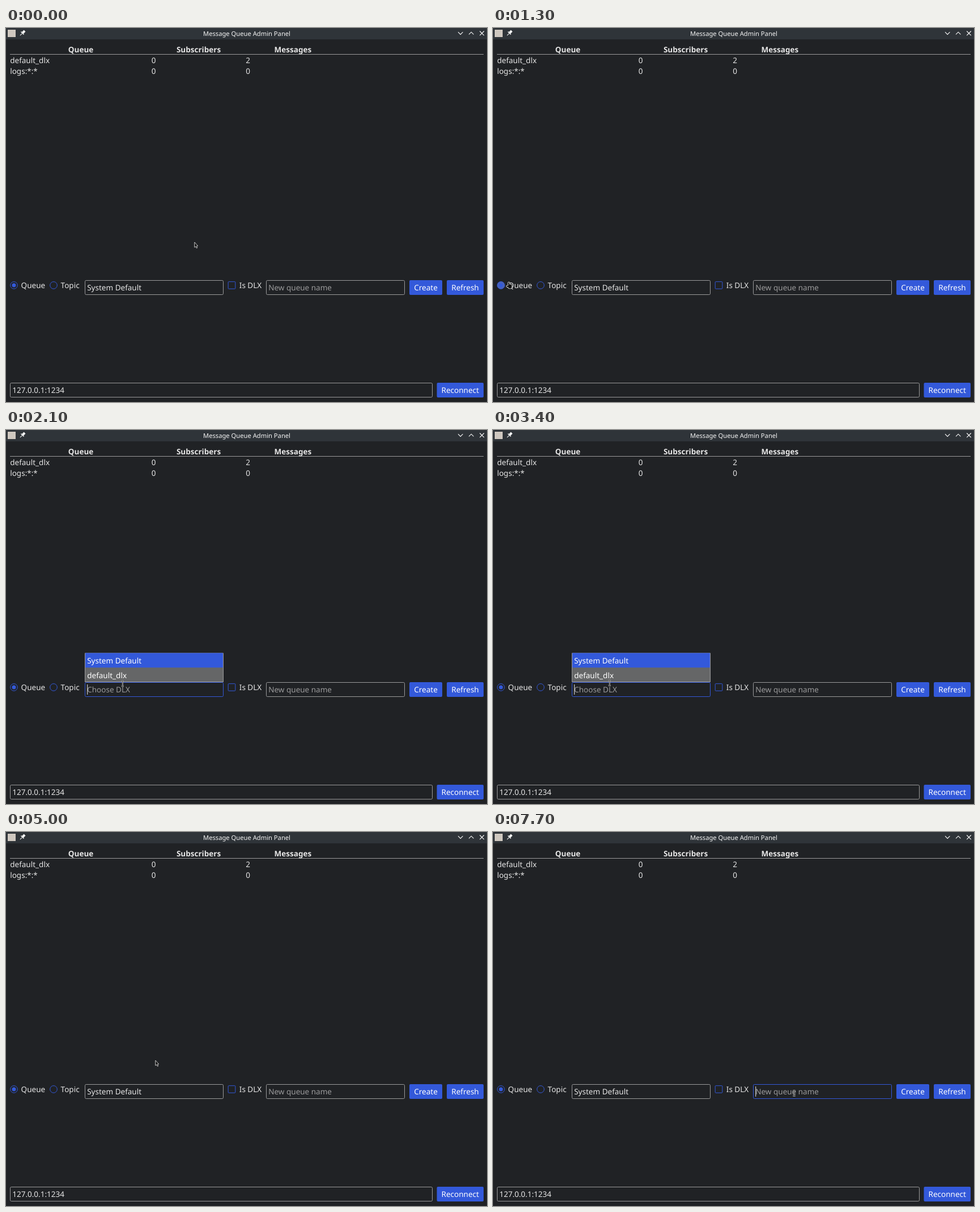
Animation, 849 px wide and 660 px high, one loop 8 s. Source, as an HTML page with a canvas:

```html
<!DOCTYPE html>
<html lang="en">
<head>
<meta charset="utf-8">
<title>Message Queue Admin Panel</title>
<style>
  html, body { margin: 0; width: 100%; height: 100%; overflow: hidden; background: #202225; }
  canvas { display: block; }
</style>
</head>
<body>
<canvas id="stage" width="849" height="660"></canvas>
<script>
const ctx = document.getElementById('stage').getContext('2d');
const LOOP = 8000, STEP = 100, SIZE = 13.52;
const BG = '#202225', TEXT = '#e6e6e6', BLUE = '#3359da', BLUE_WEAK = '#4c64b5',
      GRAY = '#9a9a9b', MENU = '#656667', WHITE = '#fff', ICON = '#fcfcfc', DARK = '#111';

// Pointer moves: start, end, target x and y
const START = [332.5, 377.5];
const MOVES = [
  [0, 900, 89, 443], [900, 1300, 28, 448], [1400, 1900, 205.8, 447.5], [3300, 3400, 205.8, 446.5],
  [3700, 4000, 204, 462], [4300, 4800, 263.5, 402.5], [5200, 5800, 531.5, 461]
];

// Boxes: x, y, width, height
const DLX = [139, 445, 245, 26], NAME = [459, 445, 245, 26], ADDRESS = [7, 626, 746, 26];
const MENU_BOX = [139, 393.5, 245, 51.5];
const QUEUE = [7, 445, 62, 18], TOPIC = [77, 445, 54, 18], IS_DLX = [392, 445, 59, 18];

const between = (t, a, b) => t >= a && t < b;
const inside = ([px, py], [x, y, w, h]) => between(px, x, x + w) && between(py, y, y + h);
const ease = k => k * k * (3 - 2 * k);

function pointerAt(t) {
  let [x, y] = START;
  for (const [from, to, nx, ny] of MOVES) {
    const k = ease(Math.min(1, Math.max(0, (t - from) / (to - from))));
    x += (nx - x) * k;
    y += (ny - y) * k;
  }
  return [x, y];
}

function rect(x, y, w, h, color) {
  ctx.fillStyle = color;
  ctx.fillRect(x, y, w, h);
}

function text(str, x, y, { color = TEXT, size = SIZE, weight = 400, align = 'left' } = {}) {
  ctx.font = `${weight} ${size}px "Noto Sans", sans-serif`;
  ctx.textRendering = 'geometricPrecision';
  ctx.textAlign = align;
  ctx.fillStyle = color;
  ctx.fillText(str, x, y);
}

function outline(x, y, w, h, color, r = 2) {
  ctx.beginPath();
  ctx.roundRect(x + .5, y + .5, w - 1, h - 1, r);
  ctx.strokeStyle = color;
  ctx.lineWidth = 1;
  ctx.stroke();
}

function line(points, color, width) {
  ctx.beginPath();
  points.forEach(([x, y]) => ctx.lineTo(x, y));
  ctx.strokeStyle = color;
  ctx.lineWidth = width;
  ctx.stroke();
}

function disc(x, y, r, color) {
  ctx.beginPath();
  ctx.arc(x, y, r, 0, 7);
  ctx.fillStyle = color;
  ctx.fill();
}

function pin(x, y) {
  ctx.save();
  ctx.translate(x, y);
  ctx.rotate(Math.PI / 4);
  rect(-2, -5, 4, 5, ICON);
  rect(-3.5, 0, 7, 1.5, ICON);
  rect(-.5, 1.5, 1, 5, ICON);
  ctx.restore();
}

function titleBar() {
  rect(0, 0, 849, 20, '#2f3439');
  rect(3, 3, 14, 13, '#cfc8c0');
  pin(29.5, 8.5);
  text('Message Queue Admin Panel', 425, 13.5, { size: 11.2, align: 'center', color: '#f4f4f4' });
  const chevron = (x, h) => line([[x - 4.2, 9.3 - h], [x, 9.3 + h], [x + 4.2, 9.3 - h]], ICON, 1.1);
  chevron(802.2, 2.1);
  chevron(821.2, -2.1);
  [-1, 1].forEach(d => line([[840 - 3.8, 9.3 - 3.8 * d], [840 + 3.8, 9.3 + 3.8 * d]], ICON, 1.1));
}

function table() {
  const edge = i => 7.2 + (i && 166.4 * (i + .5));
  ['Queue', 'Subscribers', 'Messages'].forEach((name, i) =>
    text(name, (edge(i) + edge(i + 1)) / 2, 43, { weight: 700, align: 'center' }));
  rect(7, 46, 836, 1, GRAY);
  [['default_dlx', 0, 2], ['logs:*:*', 0, 0]].forEach((row, i) =>
    row.forEach((cell, j) => text(cell, edge(j), 62 + 19 * i)));
}

function radio(label, x, on, hover) {
  if (hover) disc(x, 454, 6.8, BLUE_WEAK);
  ctx.beginPath();
  ctx.arc(x, 454, 6.3, 0, 7);
  ctx.strokeStyle = BLUE;
  ctx.lineWidth = 1;
  ctx.stroke();
  if (on) disc(x, 454, 3.5, BLUE);
  text(label, x + 12.6, 459);
}

function field(box, value, { hint = false, hover = false, focus = false, caret = false } = {}) {
  const [x, y] = box;
  outline(...box, focus ? BLUE : hover ? TEXT : GRAY);
  text(value, x + 4.2, y + 18, { color: hint ? GRAY : TEXT });
  if (caret) rect(x + 4.2, y + 4, 1, 18, TEXT);
}

function button(label, x, y, w) {
  ctx.beginPath();
  ctx.roundRect(x, y, w, 26, 2);
  ctx.fillStyle = BLUE;
  ctx.fill();
  text(label, x + w / 2, y + 18, { color: WHITE, align: 'center' });
}

function menu() {
  const [x, y, w, h] = MENU_BOX;
  rect(x, y, w, h, MENU);
  outline(x, y, w, h, GRAY, 0);
  rect(x + 1, y, w - 2, h / 2, BLUE);
  ['System Default', 'default_dlx'].forEach((item, i) =>
    text(item, x + 4.2, 412 + i * h / 2, { color: WHITE }));
}

const POINTERS = {
  arrow() {
    ctx.beginPath();
    [[.3, .5], [.3, 9.6], [2.3, 8], [3.8, 11], [5.2, 10.4], [3.9, 7.3], [6.1, 7]].forEach(p => ctx.lineTo(...p));
    ctx.closePath();
    ctx.fillStyle = DARK;
    ctx.fill();
    ctx.strokeStyle = '#ddd';
    ctx.lineWidth = .9;
    ctx.stroke();
  },
  hand() {
    const parts = new Path2D();
    parts.roundRect(-1, .5, 2, 8, 1);
    parts.roundRect(-1, 4.5, 6, 7, 1.5);
    parts.roundRect(-4, 6.5, 5, 2.5, 1);
    ctx.strokeStyle = WHITE;
    ctx.lineWidth = 1.6;
    ctx.stroke(parts);
    ctx.fillStyle = DARK;
    ctx.fill(parts);
  },
  beam() {
    const bars = [-4.7, 4.7].map(y => [[-2, y], [2, y]]);
    const parts = [...bars, [[0, -4.7], [0, 4.7]]];
    parts.forEach(p => line(p, '#ddd', 2));
    parts.forEach(p => line(p, DARK, .8));
  }
};

function draw(t) {
  const mouse = pointerAt(t);
  const open = between(t, 2100, 5000), naming = t >= 6700;
  const over = box => inside(mouse, box);

  rect(0, 0, 849, 660, BG);
  titleBar();
  table();

  radio('Queue', 14, true, over(QUEUE));
  radio('Topic', 84, false, over(TOPIC));
  field(DLX, open ? 'Choose DLX' : 'System Default', {
    hint: open, focus: open, hover: over(DLX),
    caret: open && (t < 3800 || between(t, 4200, 4700))
  });
  outline(391.7, 447.2, 13.6, 13.6, BLUE, 1);
  text('Is DLX', 411.8, 459);
  field(NAME, 'New queue name', {
    hint: true, focus: naming, hover: over(NAME),
    caret: naming && !between(t, 7200, 7700)
  });
  button('Create', 712, 445, 58);
  button('Refresh', 778, 445, 65);
  field(ADDRESS, '127.0.0.1:1234');
  button('Reconnect', 760.5, 626, 82.5);
  if (open) menu();

  const kind = over(DLX) || over(NAME) ? 'beam'
    : [QUEUE, TOPIC, IS_DLX].some(over) || (open && over(MENU_BOX)) ? 'hand' : 'arrow';
  ctx.save();
  ctx.translate(...mouse);
  POINTERS[kind]();
  ctx.restore();
}

const start = performance.now();
function tick() {
  const t = (performance.now() - start) % LOOP;
  draw(Math.floor(t / STEP) * STEP);
  requestAnimationFrame(tick);
}
tick();
</script>
</body>
</html>
```
